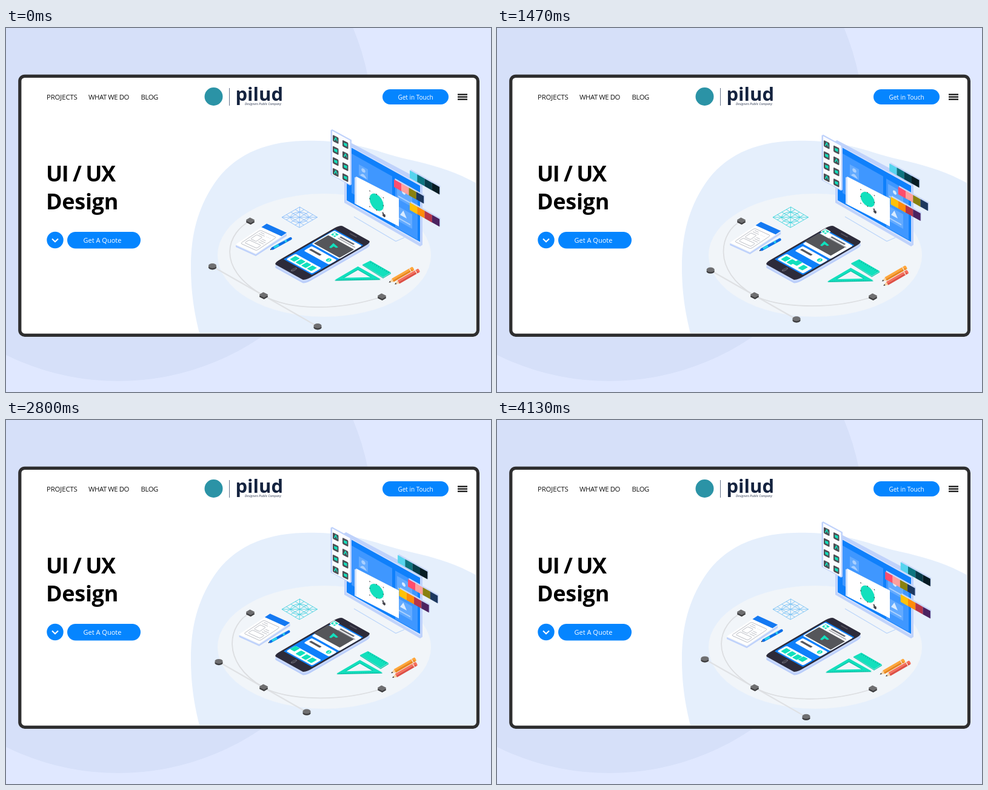
Recreate the animation shown at these times as an HTML page. Size 800 by 600 pixels, loop 4.2 s.

```html
<!DOCTYPE html>
<html lang="en">
<head>
<meta charset="utf-8">
<title>UI / UX Design</title>
<style>
  html, body { margin: 0; width: 100%; height: 100%; overflow: hidden; background: #e0e8ff; }
  svg { display: block; width: 800px; height: 600px; }
  text { font-family: "Open Sans", "Noto Sans", sans-serif; }
  .thin * { vector-effect: non-scaling-stroke; }
</style>
</head>
<body>
<svg id="stage" viewBox="0 0 800 600" xmlns="http://www.w3.org/2000/svg">
  <circle cx="185" cy="162" r="420" fill="#d6e0f9"/>
  <rect x="22.800" y="79.300" width="755.600" height="427" rx="8" fill="#fff"/>
  <path fill="#e5effc" d="M775 255.500C740 236 705 226 665 217C632 210 610 200 580 194C545 187 520 185 490 186C418 188 368 215 338 265C312 308 305 350 305 395C305 440 312 475 319 503H775Z"/>
  <rect x="22.800" y="79.300" width="755.600" height="427" rx="8" fill="none" stroke="#2e2e2f" stroke-width="5.200"/>

  <g id="labels"></g>
  <circle cx="342.500" cy="113" r="15" fill="#2b93a6"/>
  <path d="M368.500 99V128" stroke="#66748c"/>
  <path d="M745 109.600H761M745 113.600H761M745 117.600H761" stroke="#111" stroke-width="2.200"/>
  <circle cx="81" cy="349.500" r="13.700" fill="#0585ff"/>
  <path d="M76 347.500L81 352.300L86 347.500" fill="none" stroke="#fff" stroke-width="2"/>

  <ellipse cx="525" cy="374.500" rx="176" ry="101.500" fill="#f1f5f9"/>
  <g id="scene"></g>
</svg>
<script>
const LOOP = 4200, STEP = 70, BLUE = "#0585ff", TEAL = "#12e0bd", EDGE = "#bfd2fb";
const scene = document.getElementById("scene");
const labels = document.getElementById("labels");

function el(parent, tag, attrs, body) {
  const node = document.createElementNS("http://www.w3.org/2000/svg", tag);
  for (const key in attrs) node.setAttribute(key, attrs[key]);
  if (body) node.textContent = body;
  parent.append(node);
  return node;
}
const group = (parent, attrs) => el(parent, "g", attrs || {});
const poly = (parent, points, fill, more) => el(parent, "polygon", { points, fill, ...more });
const path = (parent, d, stroke, width, more) =>
  el(parent, "path", { d, fill: "none", stroke, "stroke-width": width, ...more });
const rect = (parent, x, y, width, height, fill, rx = 0) =>
  el(parent, "rect", { x, y, width, height, fill, rx });
const plane = (parent, ...m) => group(parent, { transform: `matrix(${m})` });

function label(x, y, size, body, fill, more) {
  el(labels, "text", { x, y, "font-size": size, fill, ...more }, body);
}

// Page text and buttons
label(67, 118.300, 11.300, "PROJECTS", "#111", { "letter-spacing": -0.1 });
label(136, 118.300, 11.300, "WHAT WE DO", "#111", { "letter-spacing": -0.42 });
label(222.500, 118.300, 11.300, "BLOG", "#111", { "letter-spacing": -0.4 });
label(66, 253.300, 36, "UI / UX", "#000", { "font-weight": 700, "letter-spacing": -1.5 });
label(66, 299.300, 36, "Design", "#000", { "font-weight": 700, "letter-spacing": -0.3 });
label(378.500, 120, 31, "pilud", "#14233f", { "font-weight": 700 });
label(394, 127.300, 5, "Designers Public Company", "#5b6478", { "font-style": "italic", "font-weight": 600 });
rect(labels, 621, 101, 109, 25, BLUE, 12.5);
rect(labels, 101, 336, 121, 27.5, BLUE, 13.7);
const middle = { "text-anchor": "middle" };
label(675.500, 117.800, 10, "Get in Touch", "#fff", middle);
label(159, 354, 11, "Get A Quote", "#fff", middle);

// Bezier curve with its handles
const bar = path(scene, "", "#dfe1e4", 2.2);
const curve = path(scene, "", "#dcdee1", 1.8);

function knob(x, y, round) {
  const g = group(scene, { transform: `translate(${x} ${y})` });
  for (const [dy, fill] of [[1.5, "#3d3d3f"], [-1, "#6f6f71"]]) {
    if (round) el(g, "ellipse", { cy: dy, rx: 6.6, ry: 3.9, fill });
    else poly(g, "-5.5,0 -0.5,-2.9 5.5,0 0.5,2.9", fill,
      { transform: `translate(0 ${dy})`, stroke: fill, "stroke-width": 3, "stroke-linejoin": "round" });
  }
  return g;
}
const knobA = knob(341, 393, true), knobB = knob(514, 492, true);
knob(403, 318);
knob(425, 441);
knob(620, 443);

// Drawing grid
const grid = plane(scene, .295, -.17, .29, .17, 455, 312);
grid.setAttribute("class", "thin");
grid.setAttribute("stroke-width", 0.9);
grid.setAttribute("fill", "none");
for (let i = 0; i <= 4; i++) el(grid, "path", { d: `M0 ${i * 25}H100M${i * 25} 0V100` });
el(grid, "path", { d: "M0 0L100 100M0 100L100 0" });
el(grid, "circle", { cx: 50, cy: 50, r: 36 });

// Note pad and pen
const pad = group(scene);
poly(pad, "379,358 412,373 463,339 463,343 412,376 379,361", EDGE);
const sheet = plane(pad, .51, -.34, .33, .15, 379, 356.5);
sheet.setAttribute("class", "thin");
rect(sheet, 0, 0, 100, 100, "#fff");
rect(sheet, 83, 0, 17, 100, "#1479f2");
const sketch = group(sheet, { fill: "none", stroke: "#a9adb5", "stroke-width": 0.8 });
rect(sketch, 9, 10, 64, 80, "none", 5);
rect(sketch, 16, 20, 14, 60, "none", 4);
rect(sketch, 35, 20, 20, 28, "none", 3);
el(sketch, "path", { d: "M37 56V82M43 56V82M49 56V74M61 20V50M67 20V40M62 58V60M62 66V68M62 74V76" });

const pen = group(scene);
path(pen, "M436 365.500L441 362.600", "#2d3a55", 1.6);
path(pen, "M439.500 363.500L469.500 347", "#0b6fe8", 4.4, { "stroke-linecap": "round" });
path(pen, "M442 362L450 357.500M460 352L463 350.400", "#27d3e8", 3.6);
path(pen, "M454 353L466 346.500", "#7cc0ff", 1);

// Phone
const phone = group(scene);
const BODY = [1.1, -.637, .52, .287, 441];
rect(plane(phone, ...BODY, 393.5), 0, 0, 100, 100, "#b9cdfb", 8);
rect(plane(phone, ...BODY, 391), 0, 0, 100, 100, "#c8d8fd", 8);
const face = plane(phone, ...BODY, 388);
rect(face, 0, 0, 100, 100, "#2d2b3a", 8);
rect(face, 13, 5, 77, 90, "#0f80fb", 1);
el(face, "circle", { cx: 7, cy: 50.5, r: 3.6, fill: "#45434f", stroke: "#8b8996", "stroke-width": 0.8 });
rect(face, 95, 40, 1.5, 22, "#55535f", 1);
rect(face, 15, 9, 14, 82, "#fff", 3);
const tiles = [0, 1, 2, 3].map(i => rect(face, 17.5, 15 + i * 18, 8.5, 14.5, TEAL, 1.5));
rect(face, 39, 14, 12, 80, "#fff", 3);
rect(face, 44, 20, 3, 34, "#55565c", 1);
el(face, "ellipse", { cx: 45, cy: 80.5, rx: 3.2, ry: 6, fill: TEAL });
el(face, "path", { d: "M43.500 79.500L44.500 82.500L47 79", fill: "none", stroke: "#fff", "stroke-width": 0.9 });
rect(face, 54, 7, 34, 88, "#fff", 3);
rect(face, 83, 34, 2.2, 44, "#6b6c72");
rect(face, 80, 34, 1.6, 54, "#a9abb0");
const video = group(phone);
rect(plane(video, ...BODY, 388), 56, 10, 21.5, 82, "#55565a", 1);
poly(video, "533,361.500 540,354.500 548,361.500 544.500,362.500 540.500,360 536,363", TEAL);
const avatar = group(phone);
poly(avatar, "535,340.500 542,336 550,340.500 542,345.500", TEAL,
  { stroke: "#fff", "stroke-width": 1.2, "stroke-linejoin": "round" });
el(avatar, "ellipse", { cx: 542, cy: 339.5, rx: 2, ry: 1.4, fill: "#fff" });
path(avatar, "M539 342.600L542.500 341.500L545.500 342.300", "#fff", 1.2);

// Set square, ruler and pencils
const square = group(scene);
for (const [dy, fill] of [[1.3, "#0dbfa5"], [0, TEAL]])
  el(square, "path", { fill, "fill-rule": "evenodd", transform: `translate(0 ${dy})`,
    d: "M542 415.500L580.500 393L618 414ZM556 411.800L580.500 397.800L603 410.700Z" });
path(square, "M547 415L612 413.700", "#0fae9a", 1.2, { "stroke-dasharray": "0.6 2.4" });

const ruler = group(scene);
poly(ruler, "588,390 622,411.500 635,403.500 635,405 622,412.800 588,391.300", "#0dbfa5");
poly(ruler, "588,390 601,383.500 635,403 622,411", TEAL);
path(ruler, "M601.500 386L631.500 403.300", "#0b9d8d", 2.4, { "stroke-dasharray": "0.7 3" });

function pencil(x, y, main, dark) {
  const g = group(scene);
  const rod = group(g, { transform: `translate(${x} ${y}) rotate(-30)` });
  poly(rod, "0,0 8,-3.3 8,3.3", "#f6d3a3");
  poly(rod, "0,0 3,-1.3 3,1.3", "#33333c");
  rect(rod, 7.5, -3.3, 38, 3.4, main);
  rect(rod, 7.5, 0, 38, 3.3, dark);
  rect(rod, 40, -3.3, 1.6, 6.6, "#f3d9c4");
  el(rod, "ellipse", { cx: 45.5, rx: 1.5, ry: 3.3, fill: main });
  return g;
}
const pencilA = pencil(631.5, 419.5, "#ffa63a", "#e8861d");
const pencilB = pencil(641, 422.5, "#f7705b", "#dd4f45");

// Monitor
path(scene, "M574 311L643 351.500L657 345.500", "#bcd6fa", 1.3);
poly(scene, "558,186.500 561,185 687,252 687,357.500 683,360 558,288", EDGE);
poly(scene, "561,191 683.500,258 683.500,355.500 561,285.500", "#d3e1fe");
poly(scene, "562,193 683,260 683,352.500 562,284", "#0f80fb");
const screen = plane(scene, 1, .56, 0, 1, 570, 207);
rect(screen, 0, 0, 67, 65, "#3f97ff");
rect(screen, 72, 1, 37, 80, "#3f97ff");
rect(screen, 12, 11, 15, 18, "#62aaff");
el(screen, "circle", { cx: 19.5, cy: 17, r: 3.2, fill: "#a9d0ff" });
el(screen, "path", { d: "M14 28Q19.500 18 25 28Z", fill: "#a9d0ff" });
for (let i = 0; i < 4; i++) rect(screen, 5, 36 + i * 6, 56 - i % 2 * 8, 2.2, "#62aaff");
for (const y of [8, 44]) {
  rect(screen, 75, y, 25, 24, "#62aaff");
  rect(screen, 77, y + 18, 20, 2.2, "#a9d0ff");
}
el(screen, "circle", { cx: 86, cy: 16, r: 3, fill: "#d9ebff" });
poly(scene, "650,308 655.500,301 661,314", "#d9ebff");
poly(scene, "575,246.500 578,245 578,291 575,289.500", "#cfe0fb");
poly(scene, "578,245 648,281 648,327 578,291", "#fff");

const shape = group(scene);
const box = plane(shape, 1, .5, 0, 1, 0, 0);
el(box, "ellipse", { cx: 11.3, cy: 13, rx: 11.6, ry: 13, fill: TEAL });
path(box, "M0 0H22.500V26H0Z", "#9a9aa5", 0.4, { "stroke-dasharray": "1.2 1.5" });
for (const x of [0, 11.25, 22.5])
  for (const y of [0, 13, 26])
    if (x !== 11.25 || y !== 13) rect(box, x - 0.7, y - 0.7, 1.4, 1.4, "#333");
const hand = poly(scene, "-2,-3 -0.500,-3 0.500,0 3,1 3.500,4.500 1.500,5.500 -2,2 -1,1.500", "#45454d");

// Icon panel
const panel = group(scene);
poly(panel, "535.500,168.500 538,167 570,184.500 570,258 567.500,259.500 535.500,242", EDGE);
poly(panel, "538,169.500 567.500,185.500 567.500,258 538,242", "#fbfcff");
for (let i = 0; i < 8; i++) {
  const icon = plane(panel, 1, .5, 0, 1, 539 + i % 2 * 16, 176 + i % 2 * 8.5 + (i >> 1) * 18.2);
  rect(icon, 0, 0, 9.5, 10.5, "#4d4e54", 1.5);
  if (i % 3) el(icon, "path", { d: "M2 3.500L7.500 2.500V7.500H2.500Z", fill: TEAL });
  else path(icon, "M2.500 8L5 2.500L7.500 7", TEAL, 1.6);
}

// Colour strips
function strip(x, y, colors) {
  const g = group(scene);
  const slab = plane(g, 1, .56, 0, 1, x, y);
  rect(slab, 1.5, -2.6, 49, 14, "#c9d8fb");
  colors.forEach((fill, i) => rect(slab, i * 12.25, 0, 12.35, 12.5, fill));
  return g;
}
const strips = [
  strip(666, 234.5, ["#56d4ee", "#0d7580", "#083c49", "#071c24"]),
  strip(640, 249.5, ["#ff4d6d", "#ff9f9c", "#89810f", "#1d385f"]),
  strip(666, 287.5, ["#ffc107", "#ff8b0a", "#b5354a", "#4b2360"])
];

// Parts that drift along with the slow swing: part, dx, dy
const drift = [
  [panel, 0, 11.5], [strips[0], -25, -15], [strips[1], 29, 16], [strips[2], -22, -12.5],
  [pad, 7, -4], [pen, -4, 2.3], [square, 4, 3], [ruler, -5, -3],
  [pencilA, 4.5, -2.7], [pencilB, -5, 3], [video, 0, -4.5], [avatar, -0.5, -6.5]
];
const move = (node, x, y) => node.setAttribute("transform", `translate(${x} ${y})`);
const mix = (a, b, k) => a + (b - a) * k;

function draw(time) {
  const k = Math.max(1, Math.floor(time % LOOP / STEP)) - 1;
  const beat = k % 30;
  const pull = 1 - Math.abs(beat / 15 - 1);
  const swing = (1 - Math.cos(k / 30 * Math.PI)) / 2;

  for (const [node, dx, dy] of drift) move(node, dx * swing, dy * swing);

  const ax = mix(340.5, 358, pull), ay = mix(393, 402.7, pull);
  const bx = mix(514, 484, pull), by = mix(492, 474.4, pull);
  move(knobA, ax, ay);
  move(knobB, bx, by);
  bar.setAttribute("d", `M${ax} ${ay}L425 441L${bx} ${by}`);
  curve.setAttribute("d", `M403 318C368 335 ${ax} ${ay} 425 441` +
    `C${mix(425, bx, .5)} ${mix(441, by, .5)} 550 466 620 443`);

  grid.setAttribute("stroke", `rgb(${mix(135, 20, pull)},${mix(188, 222, pull)},${mix(250, 205, pull)})`);
  tiles.forEach((tile, i) => {
    const lift = Math.max(0, 1 - Math.abs(beat - 8 - i * 5.5) / 6);
    tile.setAttribute("transform", `translate(${3.5 * lift} ${-7 * lift})`);
  });

  const tall = 1 - 0.17 * swing;
  shape.setAttribute("transform", `translate(600 ${268.5 - 3 * swing})`);
  box.setAttribute("transform", `matrix(1 ${mix(.5, .42, swing)} 0 ${tall} 0 0)`);
  move(hand, 622.5, mix(306.5, 298.5, swing));
}

function tick() {
  draw(performance.now());
  requestAnimationFrame(tick);
}
tick();
</script>
</body>
</html>
```
